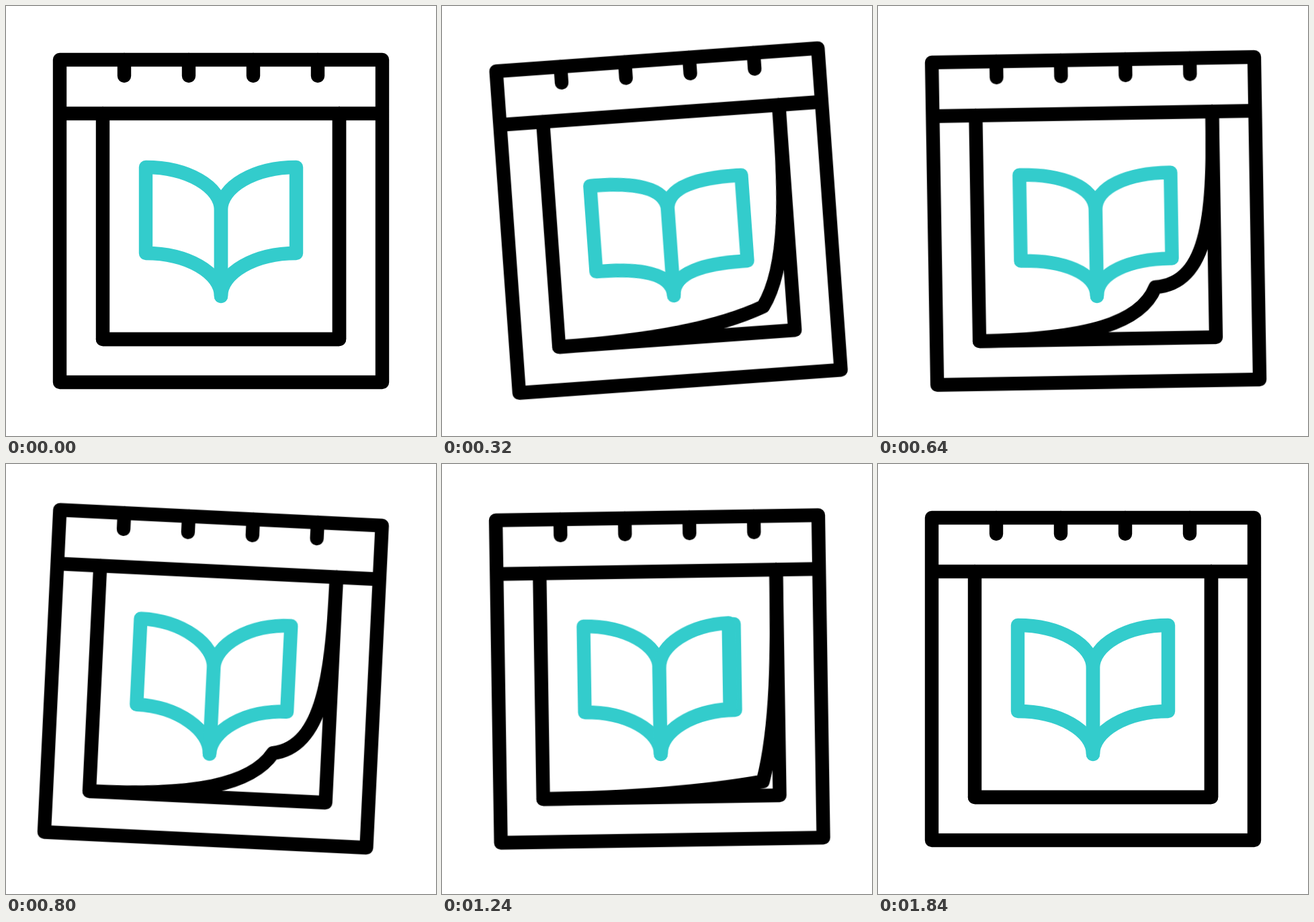
Write an HTML page without scripts that moves like this. It is 640x640 px and loops after 2 s.

```html
<!DOCTYPE html>
<html lang="en">
<head>
<meta charset="utf-8">
<title>Calendar with book</title>
<style>
  html, body { margin: 0; width: 100%; height: 100%; overflow: hidden; background: #fff; }
  svg { display: block; width: 100%; height: 100%; }

  path {
    fill: none;
    stroke: #000;
    stroke-width: 20.4;
    stroke-linecap: round;
    stroke-linejoin: round;
  }
  .book path { stroke: #3cc; }

  .calendar, .sheet, .leaf, .turn {
    animation: 2s cubic-bezier(.333, 0, .667, 1) infinite;
  }
  .calendar { transform-origin: 320px 80px; animation-name: swing; }
  .sheet { animation-name: curl; }
  .leaf { animation-name: flap; }
  .book .turn { fill: #fff; opacity: 0; animation-name: turn, show; }

  @keyframes swing {
    0%, 92%, 100% { transform: rotate(0deg); }
    22% { transform: rotate(-5deg); }
    42% { transform: rotate(3deg); }
    64% { transform: rotate(-1deg); }
  }

  /* lower right corner of the sheet lifts and settles */
  @keyframes curl {
    0%, 78%, 100% { d: path("M496 160C496 272 496 384 496 496C379 496 261 496 144 496"); }
    32% { d: path("M496 160C496 304 489 416 407 420C385 473 305 496 144 496"); }
  }

  @keyframes flap {
    0%, 62%, 100% { d: path("M320 304C320 269 270 240 208 240L208 368C270 368 320 397 320 432Z"); }
    22% { d: path("M320 304C320 269 270 263.5 207 264.5L207 392.5C270 391.5 320 397 320 432Z"); }
    42% { d: path("M320 304C320 269 270 235 208 235L208 363C270 363 320 397 320 432Z"); }
  }

  /* one leaf turns from right to left, upright halfway */
  @keyframes turn {
    0%, 59% {
      d: path("M320 304C320 269 370 240 432 240L432 368C370 368 320 397 320 432Z");
      animation-timing-function: cubic-bezier(.333, 0, .667, .5);
    }
    72.5% {
      d: path("M320 304C320 275 320 245 320 216L320 344C320 373 320 403 320 432Z");
      animation-timing-function: cubic-bezier(.333, .5, .667, 1);
    }
    86%, 100% { d: path("M320 304C320 269 270 240 208 240L208 368C270 368 320 397 320 432Z"); }
  }
  @keyframes show {
    0%, 58.99% { opacity: 0; }
    59%, 86% { opacity: 1; }
    86.01%, 100% { opacity: 0; }
  }
</style>
</head>
<body>
<svg viewBox="0 0 640 640" role="img" aria-label="Calendar with an open book">
  <g class="calendar">
    <path d="M80 80H560V560H80ZM80 160H560"/>
    <path d="M176 80V104M272 80V104M368 80V104M464 80V104"/>
    <path d="M144 160V496H496V160"/>
    <path class="sheet" d="M496 160C496 272 496 384 496 496C379 496 261 496 144 496"/>
    <g class="book">
      <path class="leaf" d="M320 304C320 269 270 240 208 240L208 368C270 368 320 397 320 432Z"/>
      <g transform="translate(640) scale(-1 1)">
        <path class="leaf" d="M320 304C320 269 270 240 208 240L208 368C270 368 320 397 320 432Z"/>
      </g>
      <path class="turn" d="M320 304C320 269 370 240 432 240L432 368C370 368 320 397 320 432Z"/>
    </g>
  </g>
</svg>
</body>
</html>
```
